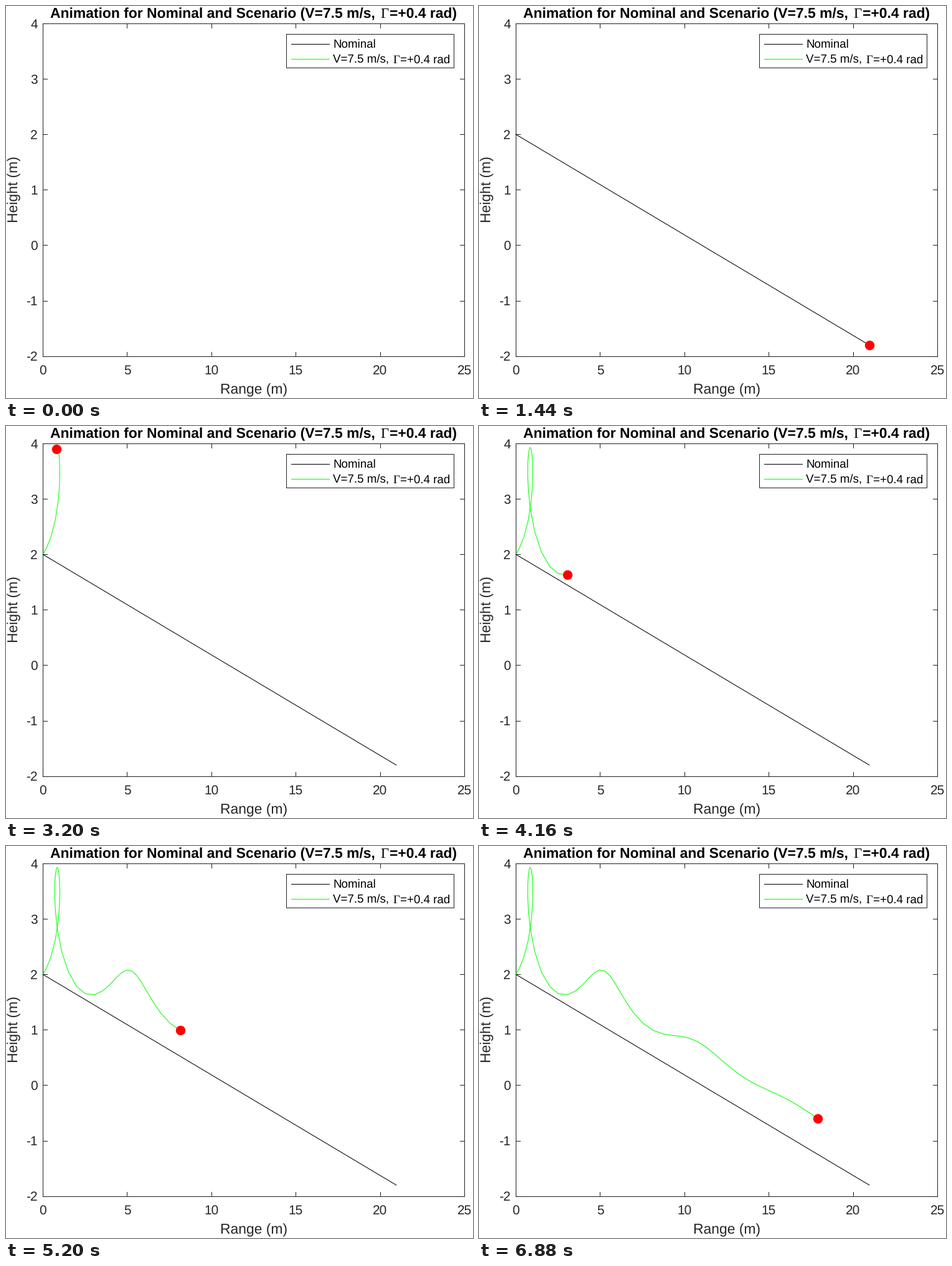
Recreate the animation shown at these times as a matplotlib script. Size 750 by 630 pixels, loop 6960 ms.

```python
import math

import numpy as np
import matplotlib.pyplot as plt
from matplotlib.animation import FuncAnimation

W, H, DPI = 750, 630, 100
LEFT, RIGHT, TOP, BOTTOM = 59, 736.4, 28, 562.7
GREY = "#262626"
GREEN = "#00ff00"
FRAMES, INTERVAL = 87, 80

# Paper glider: geometry and best-glide aerodynamics
G, RHO, AREA, MASS, ASPECT, EFF, CD0 = 9.8, 1.225, 0.017, 0.003, 0.86, 0.9, 0.02
DRAG_K = 1 / (math.pi * EFF * ASPECT)
CL = math.sqrt(CD0 / DRAG_K)
CD = CD0 + DRAG_K * CL ** 2


def motion(y):
    """Rates of speed, path angle, height and range."""
    v, gam = y[0], y[1]
    force = 0.5 * RHO * v * v * AREA / MASS
    return np.array([
        -CD * force - G * math.sin(gam),
        (CL * force - G * math.cos(gam)) / v,
        v * math.sin(gam),
        v * math.cos(gam),
    ])


def integrate(y, end=6.0, rtol=1e-3, floor=1e-3):
    """Adaptive Bogacki-Shampine 2(3) solver; returns every accepted state."""
    y = np.array(y, float)
    t, f, states = 0.0, motion(y), [y]
    max_step = 0.1 * end
    rate = np.max(np.abs(f) / np.maximum(np.abs(y), floor)) / (0.8 * rtol ** (1 / 3))
    step = min(max_step, 1 / rate)
    while t < end:
        step = min(max_step, step)
        if 1.1 * step >= end - t:
            step = end - t
        failed = False
        while True:
            k2 = motion(y + step * f / 2)
            k3 = motion(y + step * 3 * k2 / 4)
            new = y + step * (2 * f + 3 * k2 + 4 * k3) / 9
            k4 = motion(new)
            scale = np.maximum(np.maximum(np.abs(y), np.abs(new)), floor)
            slope = -5 * f / 72 + k2 / 12 + k3 / 9 - k4 / 8
            err = step * np.max(np.abs(slope) / scale)
            if err <= rtol:
                break
            step *= 0.5 if failed else max(0.5, 0.8 * (rtol / err) ** (1 / 3))
            failed = True
        t = end if end - t - step < 1e-12 else t + step
        y, f = new, k4
        states.append(y)
        if not failed:
            step /= max(0.2, 1.25 * (err / rtol) ** (1 / 3))
    return np.array(states)


def px(r):
    return LEFT + r / 25 * (RIGHT - LEFT)


def py(h):
    return BOTTOM - (h + 2) / 6 * (BOTTOM - TOP)


def flight(v, gam):
    states = integrate([v, gam, 2, 0])
    return np.column_stack([px(states[:, 3]), py(states[:, 2])])


glide = -math.atan(CD / CL)
trim = math.sqrt(2 * MASS * G / (RHO * AREA * (CL * math.cos(glide) - CD * math.sin(glide))))
nominal = flight(trim, glide)
scenario = flight(7.5, 0.4)

plt.rcParams["font.family"] = "Liberation Sans"
plt.rcParams["text.hinting"] = "none"
fig = plt.figure(figsize=(W / DPI, H / DPI), dpi=DPI, facecolor="white")
ax = fig.add_axes([0, 0, 1, 1])
ax.set_xlim(0, W)
ax.set_ylim(H, 0)
ax.axis("off")


def line(xs, ys, color=GREY, **kw):
    return ax.plot(xs, ys, color=color, lw=0.75, **kw)[0]


def label(x, y, text, size, color="black", **kw):
    return ax.text(x, y, text, fontsize=size * 72 / DPI, color=color,
                   va="baseline", **kw)


def frame_box(x0, y0, x1, y1):
    line([x0, x1, x1, x0, x0], [y0, y0, y1, y1, y0], solid_joinstyle="miter")


# Axes, ticks and labels
frame_box(LEFT, TOP, RIGHT, BOTTOM)
TICK = 7
for r in range(0, 26, 5):
    x = px(r)
    line([x, x], [BOTTOM, BOTTOM - TICK])
    line([x, x], [TOP, TOP + TICK])
    label(x, 592, str(r), 20.83, GREY, ha="center")
for h in range(-2, 5):
    y = py(h)
    line([LEFT, LEFT + TICK], [y, y])
    line([RIGHT, RIGHT - TICK], [y, y])
    label(51, y + 7.5, str(h), 20.83, GREY, ha="right")
label(398, 623, "Range (m)", 22.92, GREY, ha="center")
label(19.5, 295, "Height (m)", 22.92, GREY, ha="center",
      rotation=90, rotation_mode="anchor")

# Title
label(71, 19, "Animation for Nominal and Scenario (V=7.5 m/s, ", 22.92, weight="bold")
label(607.5, 19, "Γ", 22.92, family="Liberation Serif", ha="center")
label(724.5, 19, "=+0.4 rad)", 22.92, weight="bold", ha="right")

# Legend
frame_box(450, 45, 719, 99)
line([458, 519], [61, 61], "black")
line([458, 519], [85, 85], GREEN)
label(525, 67, "Nominal", 18.75)
label(525, 92, "V=7.5 m/s, ", 18.75)
label(626.5, 92, "Γ", 18.75, family="Liberation Serif", ha="center")
label(713.5, 92, "=+0.4 rad", 18.75, ha="right")

nominal_line = line([], [], "black", zorder=3)
scenario_line = line([], [], GREEN, zorder=4)
dot, = ax.plot([], [], "o", color="red", ms=15.4 * 72 / DPI, mew=0, zorder=5)


def draw(i):
    a = nominal[:i]
    b = scenario[:max(i - len(nominal), 0)]
    nominal_line.set_data(a[:, 0], a[:, 1])
    scenario_line.set_data(b[:, 0], b[:, 1])
    head = b[-1:] if len(b) else a[-1:]
    dot.set_data(head[:, 0], head[:, 1])
    return nominal_line, scenario_line, dot


anim = FuncAnimation(fig, draw, frames=FRAMES, interval=INTERVAL, repeat=True,
                     repeat_delay=0, blit=False)
plt.show()
```
